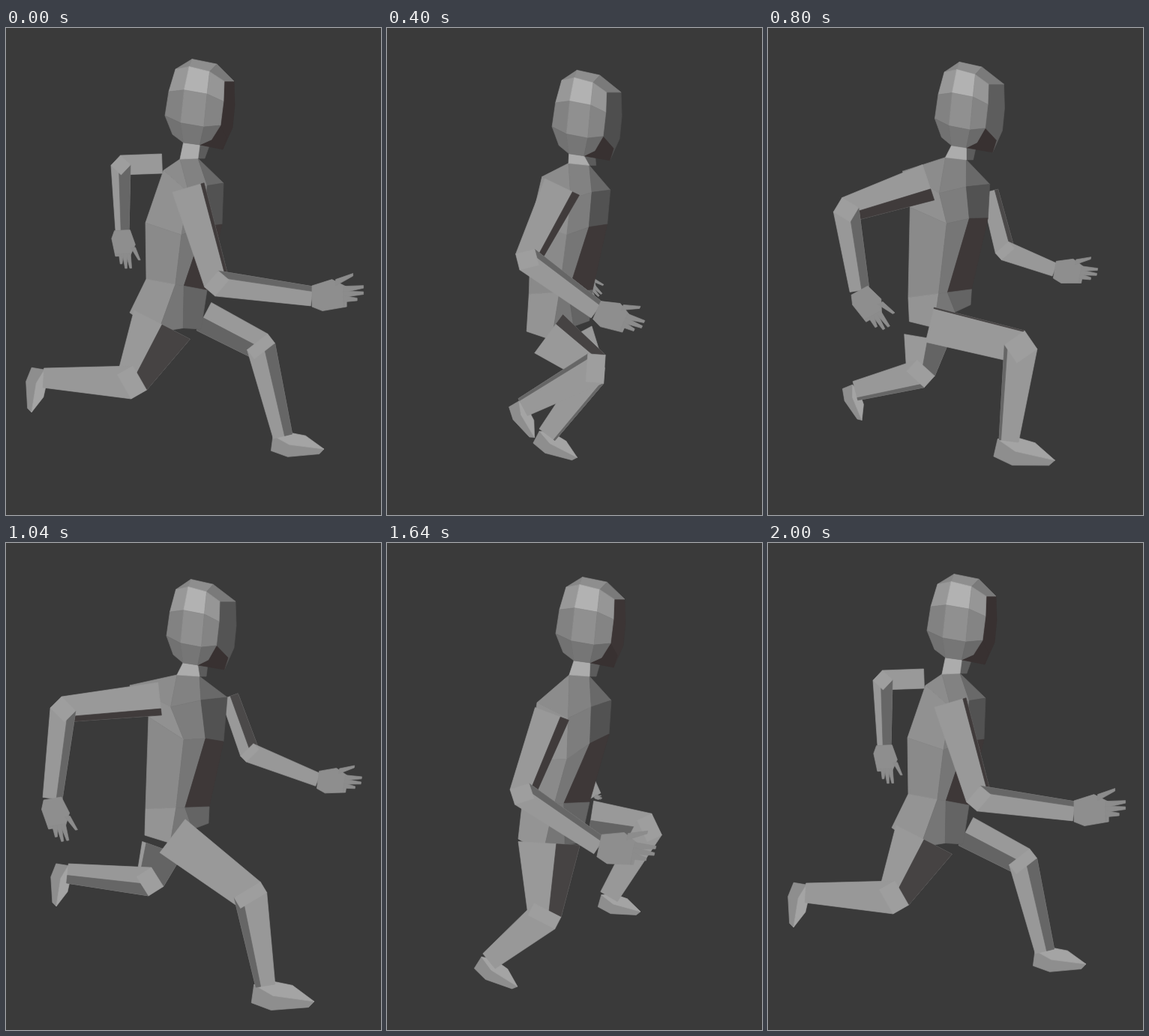
Animation of 500x650 px, one loop 2.04 s. Source, as an HTML page with a canvas:

```html
<!DOCTYPE html>
<html>
<head>
<meta charset="utf-8">
<style>
html, body { margin: 0; width: 100%; height: 100%; overflow: hidden; background: #3a3a3a; }
canvas { display: block; }
</style>
</head>
<body>
<canvas id="stage" width="500" height="650"></canvas>
<script>
const ctx = document.getElementById('stage').getContext('2d');
const LOOP = 2040, CYCLE = 2000, STEP = 40;
const times = [0, 200, 600, 1040, 1360, 1640];

// Pose: root, bend, end, tip, root half-width, dark share of the upper and lower part
// (positive on the left of the limb's direction, negative on the right)
const nearArm = {
  isArm: true, bend: 17, end: 13, dark: 64,
  poses: [
    [243,213, 281,341, 408,358, 478,358, 22, .1, .25],
    [244,216, 236,340, 359,381, 425,387, 23, 0, 0],
    [222,208, 142,275, 200,366, 250,412, 27, .38, .42],
    [205,208, 76,222, 62,341, 72,400, 22, .2, .3],
    [192,229, 112,292, 159,398, 193,454, 25, .42, .45],
    [220,228, 180,335, 283,404, 357,420, 24, .25, .25]
  ]
};
const farArm = {
  isArm: true, bend: 13, end: 9, dark: 75,
  poses: [
    [208,181, 153,183, 155,270, 157,322, 13, 0, .6],
    [215,205, 165,240, 183,320, 183,366, 18, .45, 0],
    [285,225, 290,303, 329,328, 377,345, 12, 0, 0],
    [298,205, 325,280, 416,316, 474,324, 12, .45, 0],
    [300,198, 298,280, 342,326, 387,352, 14, 0, 0],
    [285,215, 250,288, 277,338, 286,342, 12, .5, 0]
  ]
};
const nearLeg = {
  bend: 22, end: 13, dark: 70,
  poses: [
    [208,396, 168,473, 50,467, 34,513, 42, .5, 0],
    [219,411, 218,507, 94,499, 76,546, 41, .38, -.25],
    [212,402, 325,408, 263,516, 311,549, 24, .12, 0],
    [222,391, 326,470, 346,591, 411,612, 28, 0, -.25],
    [224,398, 264,508, 197,571, 240,608, 40, .28, -.2],
    [216,401, 210,498, 136,558, 174,592, 41, .38, 0]
  ]
};
const farLeg = {
  bend: 19, end: 13, dark: 100,
  poses: [
    [264,385, 340,425, 369,545, 424,562, 21, -.45, .4],
    [266,405, 315,452, 270,552, 315,578, 28, 0, .25],
    [226,415, 235,467, 168,524, 200,558, 31, 0, 0],
    [208,408, 192,452, 82,441, 67,485, 28, .9, .4],
    [266,392, 300,455, 185,463, 198,503, 24, -.3, .8],
    [272,368, 350,380, 296,472, 338,492, 24, -.45, 0]
  ]
};
// Left and right end of each ring, from the neck down to the pelvis
const torso = [
  [232,175,256,174, 210,190,290,207, 186,260,288,262, 187,335,268,350, 165,380,260,402],
  [237,187,266,188, 215,200,296,218, 193,268,290,275, 190,345,275,352, 179,410,268,410],
  [244,173,270,177, 195,195,298,212, 190,250,296,250, 188,362,272,348, 190,395,270,372],
  [228,176,258,178, 165,190,295,206, 190,232,290,265, 186,355,271,352, 185,390,270,374],
  [242,186,266,190, 178,210,312,212, 196,258,298,280, 186,362,270,362, 187,390,271,385],
  [243,176,270,178, 200,213,299,210, 190,290,296,255, 180,350,270,346, 175,395,258,400]
];
// Per ring: where the two inner ridges lie and how far they sag
const torsoRings = [[.42, .73, 22, 8], [.47, .76, 15, 4], [.48, .62, 0, 0], [.4, .75, 17, 4]];
const torsoGrey = [[140, 130, 105], [145, 125, 82], [138, 118, 62], [148, 118, 100]];

// Head pose: left, top, width of the lit back, grey of the face
const head = [
  [212,43,79,56], [210,65,74,58], [228,48,72,95],
  [214,50,71,84], [225,62,68,86], [225,47,78,60]
];
// Head rings: left end, right end, sag
const skull = [[14,12,93,28,-18], [14,12,79,28,-8], [5,42,78,55,-6], [0,74,74,87,6], [10,99,62,106,9]];
const skullGrey = [[135, 142, 122], [152, 178, 150], [130, 144, 132], [114, 118, 106]];

const palm = [0,.2, .38,.32, .66,.18, .66,-.2, .2,-.28, 0,-.2];
const sole = [-.22,-.05, -.16,-.4, .25,-.42, .93,-.14, 1,0, .2,-.12];
const instep = [-.22,-.05, .05,.12, .5,.17, 1,0, .2,-.14];

const pairs = a => Array.from({length: a.length / 2}, (_, i) => [a[2 * i], a[2 * i + 1]]);

// Cyclic cubic interpolation through the key poses
function poseAt(poses, t) {
  const n = times.length;
  const at = k => times[(k + n) % n] + CYCLE * Math.floor(k / n);
  const row = k => poses[(k + n) % n];
  let i = n - 1;
  while (times[i] > t) i--;
  const d = at(i + 1) - at(i), s = (t - at(i)) / d, r = 1 - s;
  return row(i).map((p, k) => {
    const q = row(i + 1)[k];
    const m0 = (q - row(i - 1)[k]) / (at(i + 1) - at(i - 1)) * d;
    const m1 = (row(i + 2)[k] - p) / (at(i + 2) - at(i)) * d;
    return (1 + 2 * s) * r * r * p + s * r * r * m0 + s * s * (3 - 2 * s) * q - s * s * r * m1;
  });
}

function face(points, grey) {
  const warm = Math.max(0, Math.min(7, (80 - grey) / 3));
  ctx.fillStyle = ctx.strokeStyle = `rgb(${grey},${grey - warm},${grey - warm})`;
  ctx.beginPath();
  points.forEach(p => ctx.lineTo(p[0], p[1]));
  ctx.closePath();
  ctx.fill();
  ctx.stroke();
}

function strip(upper, lower, greys) {
  greys.forEach((g, i) => face([upper[i], upper[i + 1], lower[i + 1], lower[i]], g));
}

// Four points from l to r, the inner two lowered by their sag
function ring(l, r, [f1, f2, sag1, sag2]) {
  const mid = (f, sag) => [l[0] + (r[0] - l[0]) * f, l[1] + (r[1] - l[1]) * f + sag];
  return [l, mid(f1, sag1), mid(f2, sag2), r];
}

// Places a shape along root-tip; its v axis points to the left of that line
function along([x, y], [tx, ty], shape, grey) {
  const dx = tx - x, dy = ty - y;
  face(pairs(shape).map(([u, v]) => [x + u * dx + v * dy, y + u * dy - v * dx]), grey);
}

function hand(wrist, tip) {
  const finger = (u, v, tu, tv) =>
    along(wrist, tip, [u, v + .06, tu, tv + .025, tu, tv - .025, u, v - .06], 140);
  along(wrist, tip, palm, 142);
  finger(.45, .26, .78, .41);
  for (let i = 0; i < 4; i++) finger(.6, .13 - .09 * i, .98 - .06 * i * (i - 1), .18 - .12 * i);
}

// Tapered part with a dark band on one side; returns its corners at q
function segment(p, q, wp, wq, share, lit, dark) {
  const dx = q[0] - p[0], dy = q[1] - p[1], len = Math.hypot(dx, dy);
  const edge = (c, w, s) => [c[0] + dy / len * w * s, c[1] - dx / len * w * s];
  const band = (a, b, grey) =>
    face([edge(p, wp, a), edge(p, wp, b), edge(q, wq, b), edge(q, wq, a)], grey);
  const side = share < 0 ? -1 : 1;
  band(-1, 1, lit);
  if (Math.abs(share) > .02) band(side, side - 2 * share, dark);
  return [edge(q, wq, -1), edge(q, wq, 1)];
}

function limb({poses, isArm, bend, end, dark}, t) {
  const v = poseAt(poses, t), [a, b, c, tip] = pairs(v.slice(0, 8));
  const [width, upper, lower] = v.slice(8);
  if (!isArm) {
    along(c, tip, sole, 142);
    along(c, tip, instep, 164);
  }
  const corners = segment(a, b, width, bend, upper, 153, dark);
  segment(b, c, bend, end, lower, 152, 102);
  const dx = c[0] - b[0], dy = c[1] - b[1], k = bend / Math.hypot(dx, dy);
  for (const s of [-k, k]) corners.push([b[0] + s * dy, b[1] - s * dx]);
  const angle = p => Math.atan2(p[1] - b[1], p[0] - b[0]);
  face(corners.sort((p, q) => angle(p) - angle(q)), 158);
  if (isArm) hand(c, tip);
}

function body(t) {
  const p = pairs(poseAt(torso, t)), [a, b] = p;
  const rows = torsoRings.map((r, k) => ring(p[2 * k + 2], p[2 * k + 3], r));
  [[a, a, b, b], ...rows.slice(0, 3)].forEach((r, k) => strip(r, rows[k], torsoGrey[k]));

  const [x, y, back, side] = poseAt(head, t);
  const put = ([u, w]) => [x + (u < 80 ? u * back / 79 : u - 1), y + w];
  const rings = skull.map(([lx, ly, rx, ry, sag]) =>
    ring([lx, ly], [rx, ry], [.28, .7, sag, sag]).map(put));
  const [, n1, n2, n3] = rings[4], chin = [x + 77, y + 119];
  face([n2, n3, [b[0] + 9, b[1]], b], 92);
  face([n1, n2, b, a], 172);
  face([...[[79, 28], [93, 28], [94, 60], [91, 90]].map(put), chin, n3], side);
  face([rings[3][3], [x + 82, y + 103], chin, n2, n3], 56);
  skullGrey.forEach((g, k) => strip(rings[k], rings[k + 1], g));
}

function draw(now) {
  const t = Math.floor(now % LOOP / STEP) * STEP % CYCLE;
  ctx.fillStyle = '#3a3a3a';
  ctx.fillRect(0, 0, 500, 650);
  ctx.lineWidth = 0.7;
  ctx.lineJoin = 'round';
  limb(farArm, t);
  limb(farLeg, t);
  body(t);
  limb(nearLeg, t);
  limb(nearArm, t);
  requestAnimationFrame(() => draw(performance.now() - start));
}
const start = performance.now();
draw(0);
</script>
</body>
</html>
```
